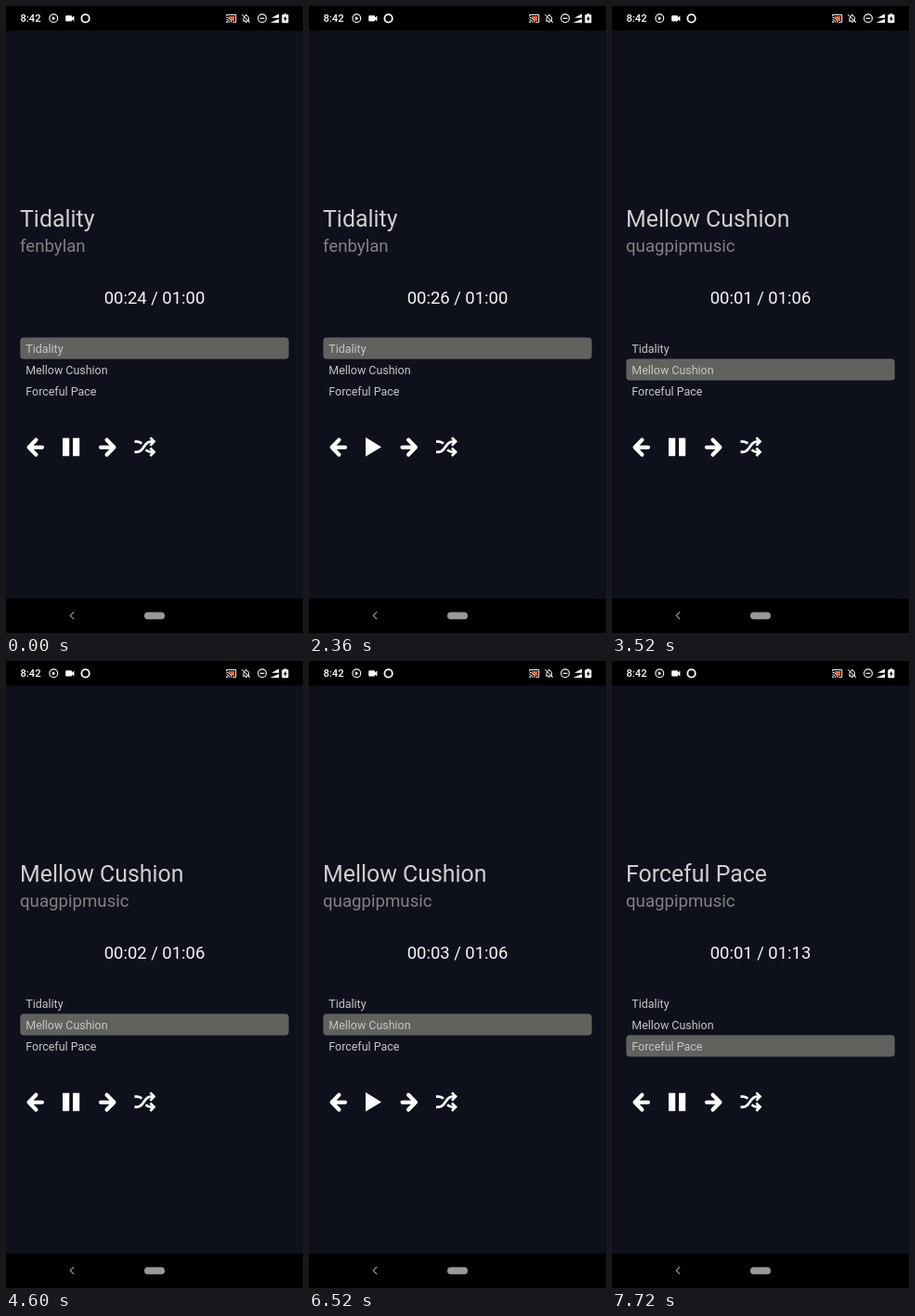
An HTML page that plays this animation: 320x676 px, repeating every 8000 ms.

```html
<!DOCTYPE html>
<html lang="en">
<head>
<meta charset="utf-8">
<title>Music player</title>
<style>
  html, body { margin: 0; width: 100%; height: 100%; overflow: hidden; background: #0e111c; }
  svg { display: block; width: 100%; height: 100%; font-family: Roboto, sans-serif; }
  #title { font-size: 24.89px; fill: #cfcfcf; }
  #artist { font-size: 18.67px; fill: #828282; }
  #clock { font-size: 18.45px; fill: #f6f6f6; text-anchor: middle; }
  #list { font-size: 12.44px; fill: #c6c6c6; }
  .line { fill: none; stroke: #fff; }
</style>
</head>
<body>
<svg viewBox="0 0 320 676">
  <rect width="320" height="676" fill="#0e111c"/>
  <rect width="320" height="26.5" fill="#000"/>
  <rect y="639" width="320" height="37" fill="#000"/>

  <g id="status" fill="#fff">
    <text x="15.5" y="17.2" font-size="11.2" font-weight="500">8:42</text>
    <circle class="line" cx="51.3" cy="13.3" r="4.4" stroke-width="1.1"/>
    <path d="M50 11.2l3.4 2.1-3.4 2.1z"/>
    <path d="M65 10.2h5.2q.8 0 .8.8v1.4l2.4-2v6l-2.4-2v1.4q0 .8-.8.8H65q-.8 0-.8-.8V11q0-.8.8-.8z"/>
    <circle class="line" cx="85.6" cy="13.4" r="4.2" stroke-width="1.8"/>
    <path d="M239.4 11h6.8v5h-3z" fill="#e8623c"/>
    <path class="line" d="M237.7 11.2V9.4h10v8h-3.4M237.5 12.4a5.4 5.4 0 0 1 5.4 5.4M237.5 14.6a3.2 3.2 0 0 1 3.2 3.2"/>
    <circle cx="238.1" cy="17.2" r=".9"/>
    <path class="line" d="M255.2 16.2h6.8M256 16v-3.2a2.8 2.8 0 0 1 5.4-.6v3.8M258.7 10V8.6M254.2 9.2l8.8 8.6"/>
    <path d="M257.6 17h2.2l-1.1 1.3z"/>
    <circle class="line" cx="276" cy="13.3" r="4.4" stroke-width="1.1"/>
    <path class="line" d="M273.6 13.3h4.8" stroke-width="1.2"/>
    <path d="M284.6 18l9.4-4v4zM286 12.8l8-4.2v4.2z"/>
    <path d="M298 9.3h1.6V8.2h2.3v1.1h1.7q.7 0 .7.7v7.5q0 .7-.7.7H298q-.7 0-.7-.7V10q0-.7.7-.7z"/>
    <path d="M301.4 10.5l-2.5 3.7h1.5v2.7l2.4-3.7h-1.4z" fill="#000"/>
  </g>

  <text id="title" x="15" y="238"/>
  <text id="artist" x="15" y="264.5"/>
  <text id="clock" x="160" y="321"/>
  <rect id="marker" x="15.7" width="288.6" height="22.4" rx="3" fill="#60625e" stroke="#696b67" stroke-width=".6"/>
  <g id="list"></g>

  <g id="controls" fill="#fff">
    <path id="arrow" class="line" d="M39 475.8H26M32.4 467.8l-7.8 8 7.8 8" stroke-width="4.2"
      stroke-linecap="round" stroke-linejoin="round"/>
    <path id="pause" d="M61 465.7h7.2v19.6H61zM72 465.7h7.2v19.6H72z"/>
    <path id="play" d="M61 465l17 10.4-17 10.4z"/>
    <g id="right">
      <use href="#arrow" transform="matrix(-1 0 0 1 141 0)"/>
      <path class="line" stroke-width="2.8" d="M138.5 480.8h2.8c7.4 0 7.2-11.2 14.6-11.2h4M138.5 469.6h2.8q3 0 5 2.2M150.6 478.4q2.2 2.4 5.3 2.4h4"/>
      <path class="line" stroke-width="2.6" d="M155.4 465.4l4.2 4.2-4.2 4.2M155.4 476.6l4.2 4.2-4.2 4.2"/>
    </g>
  </g>

  <path class="line" d="M73.2 653.2l-4 4 4 4" stroke-width="1.1" style="stroke:#a0a0a0"/>
  <rect x="149" y="653.6" width="22" height="7.6" rx="3.8" fill="#989898"/>
</svg>
<script>
const LOOP = 8000;
const tracks = [
  { name: "Tidality", artist: "fenbylan", length: "01:00" },
  { name: "Mellow Cushion", artist: "quagpipmusic", length: "01:06" },
  { name: "Forceful Pace", artist: "quagpipmusic", length: "01:13" }
];
// Each skip stops playback, moves the marker, loads the track, then resumes.
const skips = [
  { stop: 2360, mark: 2400, load: 2440, resume: 2480 },
  { stop: 6520, mark: 6600, load: 6640, resume: 6640 }
];
// Start time and first second shown for each track; one tick per 1080 ms.
const starts = [[-200, 24], [2440, 0], [6640, 0]];
const TICK = 1080;

const el = id => document.getElementById(id);
const show = (id, visible) => el(id).setAttribute("visibility", visible ? "visible" : "hidden");

el("list").innerHTML = tracks.map((track, i) =>
  `<text x="21.3" y="${373.7 + 23 * i}">${track.name}</text>`).join("");

function draw(t) {
  const passed = key => skips.filter(skip => t >= skip[key]).length;
  const loaded = passed("load"), marked = passed("mark");
  const paused = passed("stop") > passed("resume");
  const track = tracks[loaded];
  const [start, first] = starts[loaded];
  // The ticker halts once a skip has stopped playback.
  const until = Math.min(t, skips[loaded]?.stop ?? LOOP);
  const seconds = first + Math.floor((until - start) / TICK);

  el("title").textContent = track.name;
  el("artist").textContent = track.artist;
  el("clock").textContent = `00:${String(seconds).padStart(2, "0")} / ${track.length}`;
  el("marker").setAttribute("y", 357.8 + 23 * marked);
  show("pause", !paused);
  show("play", paused);
  el("right").setAttribute("transform", `translate(${paused ? -1.5 : 0} 0)`);
}

function frame() {
  draw(performance.now() % LOOP);
  requestAnimationFrame(frame);
}
frame();
</script>
</body>
</html>
```
